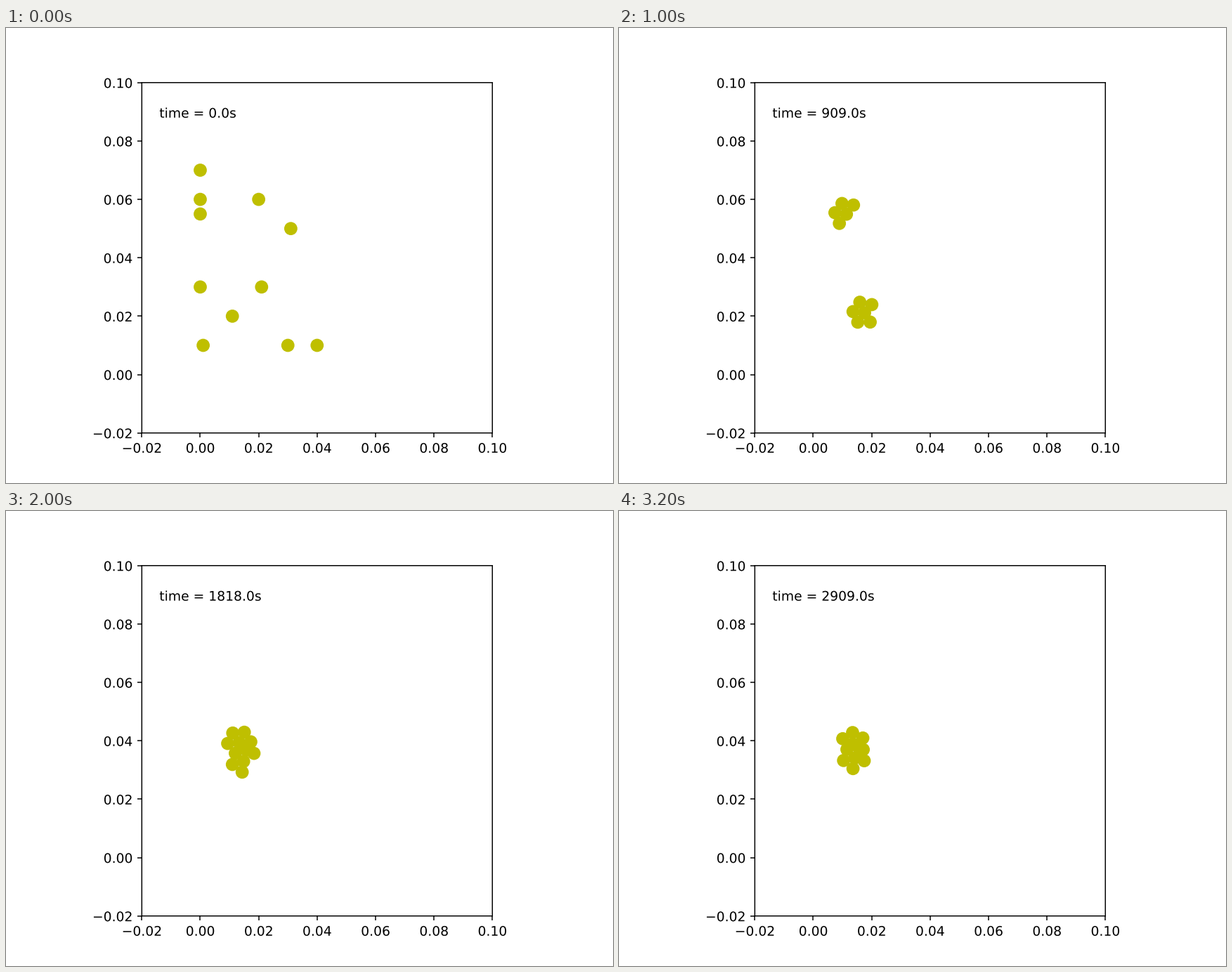
Recreate the animation shown at these times as a matplotlib script. Size 864 by 648 pixels, loop 3300 ms.

```python
import numpy as np
import matplotlib.pyplot as plt
from matplotlib.animation import FuncAnimation
from matplotlib.patheffects import Normal

FRAMES = 33
GATHER = 3    # first clusters have formed
DOCK = 5.5    # late pair joins the lower cluster
MERGE = 17    # both clusters have met
SCALE = 4158  # pixels per data unit
ORIGIN = 276.44 + 493.56j
GAP = 16.5    # distance between touching balls

# Starting places in data units, x + yj
START = np.array([
    70j, 60j, 55j, 20 + 60j, 31 + 50j,
    30j, 21 + 30j, 11 + 20j, 1 + 10j, 30 + 10j, 40 + 10j,
]) / 1000


def turn(deg):
    return np.exp(1j * np.radians(deg))


def stage(i, start, end):
    return np.clip((i - start) / (end - start), 0, 1)


def via(first, met, last, before, after):
    """Go from first to met, then on to last."""
    return first + (met - first) * before + (last - met) * after


def clustered(i):
    """Ball centres in data units once the clusters exist."""
    t = stage(i, GATHER, MERGE)
    after = stage(i, MERGE, FRAMES - 1)
    pull = t ** 2.65              # attraction grows as the gap closes
    spin = np.sin(t * np.pi / 2)  # rotation dies down

    upper = GAP * np.array([-1, turn(120), turn(60), 0, 1])
    upper = upper * turn(via(30, 168, 208, spin, after))

    angle = via(4, 134, 137, spin, after)
    long = np.sqrt(3) / 2
    rhombus = GAP * turn(angle) * np.array([-long, long, -0.5j, 0.5j])

    slip = 34 * pull ** 3 * (1 - 1.5 * after)
    docked = 1.3 * GAP * turn(angle - np.array([126 + slip, 55]))
    afar = np.array([70 + 28j, 82 + 39j])
    pair = afar + (docked - afar) * stage(i, GATHER, DOCK) ** 1.2
    lower = np.concatenate([rhombus, pair])

    # Each cluster moves by its centre of mass
    upper += via(317 + 250j, 330.5 + 323.5j, 335.7 + 327j, pull, after) - upper.mean()
    lower += via(349 + 415j, 337 + 354j, 333.7 + 350.8j, pull, after) - lower.mean()
    return np.conj(np.concatenate([upper, lower]) - ORIGIN) / SCALE


def positions(i):
    u = stage(i, 0, GATHER) ** 1.5
    return START + (clustered(max(i, GATHER)) - START) * u


# Place lines, balls and glyphs between pixels instead of snapping them
plt.rcParams["path.snap"] = False
plt.rcParams["path.effects"] = [Normal()]

fig = plt.figure(figsize=(6.4, 4.8), dpi=135)
ax = fig.add_subplot(111, aspect="equal", xlim=(-0.02, 0.1), ylim=(-0.02, 0.1))
balls, = ax.plot([], [], "yo", ms=9)
label = ax.text(0.05, 0.9, "", transform=ax.transAxes)


def update(i):
    z = positions(i)
    balls.set_data(z.real, z.imag)
    label.set_text(f"time = {i * 1000 // 11:.1f}s")
    return balls, label


anim = FuncAnimation(fig, update, frames=FRAMES, interval=100,
                     repeat=True, repeat_delay=0)
plt.show()
```
